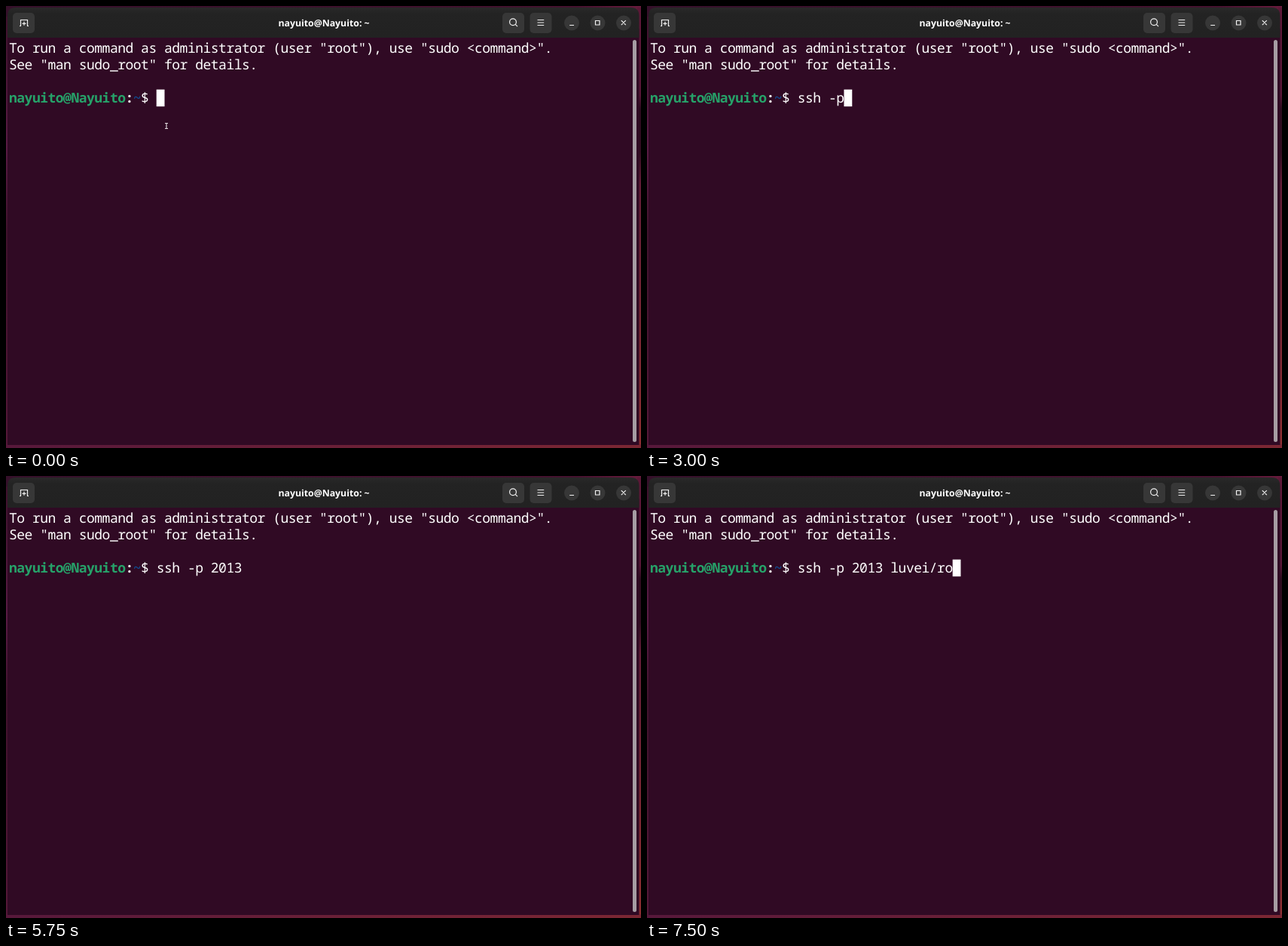
An HTML page for the animation above (8 s loop, 843 by 586 pixels).

```html
<!DOCTYPE html>
<html lang="en">
<head>
<meta charset="utf-8">
<title>Terminal</title>
<style>
  html, body { margin: 0; width: 100%; height: 100%; overflow: hidden; background: #300a24; }
  svg { display: block; width: 843px; height: 586px; }
  text { white-space: pre; text-rendering: geometricPrecision; }
  #screen text { font: 18px "Noto Sans Mono", monospace; letter-spacing: -.5px; fill: #fff; }
  #screen .bold { font-weight: 700; }
  #screen .user { font-weight: 700; fill: #26a269; }
  #screen .path { font-weight: 700; fill: #12488b; }
  .title { font: 700 12.3px "Open Sans", sans-serif; fill: #fff; text-anchor: middle; }
  .icon { fill: none; stroke: #f2f2f2; stroke-width: 1.2; }
  .button { fill: #373737; }
</style>
</head>
<body>
<svg viewBox="0 0 843 586">
  <defs>
    <linearGradient id="top">
      <stop offset="0" stop-color="#35102a"/>
      <stop offset=".9" stop-color="#43122e"/>
      <stop offset="1" stop-color="#671b3c"/>
    </linearGradient>
    <linearGradient id="left" x2="0" y2="1">
      <stop offset="0" stop-color="#3d122c"/>
      <stop offset=".3" stop-color="#581b44"/>
      <stop offset=".5" stop-color="#3f122c"/>
      <stop offset="1" stop-color="#541838"/>
    </linearGradient>
    <linearGradient id="right" x2="0" y2="1">
      <stop offset="0" stop-color="#5c1837"/>
      <stop offset=".2" stop-color="#551635"/>
      <stop offset=".23" stop-color="#2b0b1d"/>
      <stop offset=".33" stop-color="#310d20"/>
      <stop offset=".4" stop-color="#611d36"/>
      <stop offset="1" stop-color="#8c2f31"/>
    </linearGradient>
    <linearGradient id="bottom">
      <stop offset="0" stop-color="#57183b"/>
      <stop offset="1" stop-color="#7c2733"/>
    </linearGradient>
    <linearGradient id="bar" x2="0" y2="1">
      <stop offset="0" stop-color="#292929"/>
      <stop offset=".2" stop-color="#232323"/>
      <stop offset="1" stop-color="#222"/>
    </linearGradient>
  </defs>

  <rect width="843" height="586" fill="url(#top)"/>
  <rect y="14" width="4" height="572" fill="url(#left)"/>
  <rect x="838" y="2" width="5" height="584" fill="url(#right)"/>
  <rect y="581" width="843" height="5" fill="url(#bottom)"/>
  <rect x="2" y="30" width="838.5" height="552" fill="#300a24"/>
  <path d="M2 42V13Q2 2 13 2H829.5Q840.5 2 840.5 13V42Z" fill="url(#bar)"/>
  <rect x="832" y="45" width="5" height="533" rx="2.5" fill="#a69da3"/>

  <g class="button">
    <rect x="9" y="9" width="29" height="27" rx="5"/>
    <rect x="659" y="9" width="29" height="27" rx="5"/>
    <rect x="695.5" y="9" width="29" height="27" rx="5"/>
    <circle cx="751" cy="22.5" r="10"/>
    <circle cx="785.5" cy="22.5" r="10"/>
    <circle cx="820" cy="22.5" r="10"/>
  </g>
  <g class="icon">
    <path d="M18 26.5H19.5V18.5H28.5V26.5H30M24 20.8V25.8M21.5 23.3H26.5"/>
    <circle cx="673" cy="21.2" r="4.4"/>
    <path d="M676.2 24.4L679 27.2M705.5 18.5H714.2M705.5 22H714.2M705.5 25.5H714.2"/>
    <path d="M748.2 25.5H754M782.5 19.5H788V25H782.5ZM816.8 19.2L822.8 25.2M822.8 19.2L816.8 25.2"/>
  </g>
  <text class="title" x="422" y="26.5">nayuito@Nayuito: ~</text>

  <g id="screen"></g>
  <rect id="cursor" y="110.7" width="10.8" height="22.5" fill="#fff"/>
  <path id="pointer" d="M211 155.5H215M213 155.5V162.5M211 162.5H215" fill="none" stroke="#e4dce1" stroke-width="1.1"/>
</svg>
<script>
  const LOOP = 8000, CELL = 10.3, LEFT = 4, ROW = 22.3, BASE = 61.5;
  const PROMPT_COLS = 19;
  const COMMAND = 'ssh -p 2013 luvei/ro';

  // [time in ms, characters typed, cursor shown]
  const STEPS = [
    [0, 0, 1], [250, 0, 0], [1000, 0, 1], [1250, 1, 1], [1500, 3, 1],
    [2000, 4, 1], [2250, 4, 0], [2750, 5, 1], [3000, 6, 1], [3500, 7, 1],
    [4000, 7, 0], [4500, 8, 1], [4750, 10, 1], [5000, 11, 1], [5250, 12, 1],
    [5750, 12, 0], [6000, 13, 1], [6250, 15, 1], [6500, 17, 1],
    [7000, 18, 1], [7250, 19, 1], [7500, 20, 1]
  ];

  const byId = id => document.getElementById(id);
  const screen = byId('screen'), cursor = byId('cursor'), pointer = byId('pointer');
  const colX = col => LEFT + col * CELL;

  function write(row, col, str, cls = '') {
    const el = document.createElementNS('http://www.w3.org/2000/svg', 'text');
    el.setAttribute('x', colX(col));
    el.setAttribute('y', BASE + row * ROW);
    el.setAttribute('class', cls);
    el.textContent = str;
    return screen.appendChild(el);
  }

  write(0, 0, 'To run a command as administrator (user "root"), use "sudo <command>".');
  write(1, 0, 'See "man sudo_root" for details.');
  write(3, 0, 'nayuito@Nayuito', 'user');
  write(3, 15, ':', 'bold');
  write(3, 16, '~', 'path');
  write(3, 17, '$');
  const input = write(3, PROMPT_COLS, '');

  let shown = null;
  function draw(t) {
    const step = STEPS.findLast(s => s[0] <= t);
    if (step === shown) return;
    shown = step;
    const [start, typed, on] = step;
    input.textContent = COMMAND.slice(0, typed);
    cursor.setAttribute('x', colX(PROMPT_COLS + typed));
    cursor.setAttribute('visibility', on ? 'visible' : 'hidden');
    pointer.setAttribute('visibility', start === 0 ? 'visible' : 'hidden');
  }

  const origin = performance.now();
  function tick() {
    draw((performance.now() - origin) % LOOP);
    requestAnimationFrame(tick);
  }
  tick();
</script>
</body>
</html>
```
